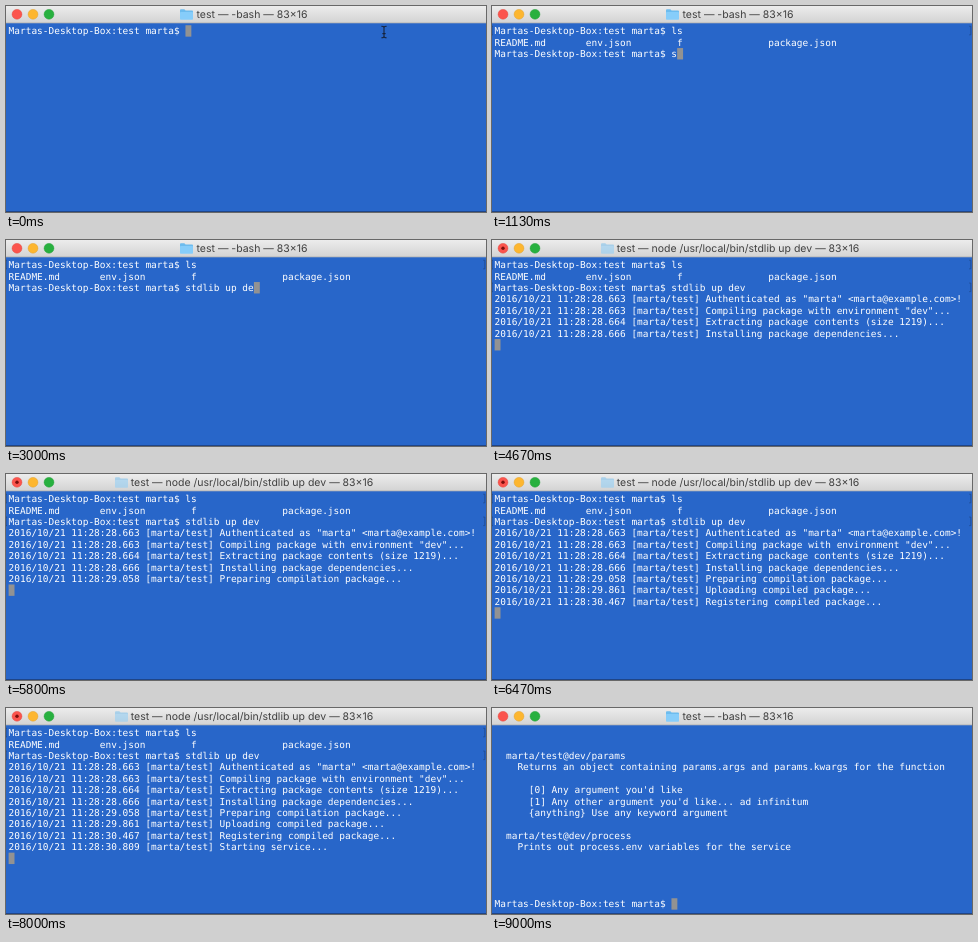
These frames come from a looping animation (480 px wide and 206 px high, 9070 ms). An HTML page:

```html
<!DOCTYPE html>
<html lang="en">
<head>
<meta charset="utf-8">
<title>Terminal</title>
<style>
  html, body { margin: 0; width: 100%; height: 100%; overflow: hidden; background: #2866c9; }
  svg { display: block; width: 100vw; height: 100vh; }
  text { white-space: pre; text-rendering: geometricPrecision; }
  #screen text { font: 9.476px "DejaVu Sans Mono", monospace; fill: #fff; }
  #title { font: 10.5px Inter, Roboto, sans-serif; fill: #404040; text-anchor: middle; }
  #marks path { fill: none; stroke: #1d4687; stroke-opacity: .7; }
</style>
</head>
<body>
<svg viewBox="0 0 480 206">
  <defs>
    <linearGradient id="chrome" x2="0" y2="1">
      <stop stop-color="#ececec"/>
      <stop offset="1" stop-color="#d3d3d3"/>
    </linearGradient>
  </defs>
  <rect width="480" height="206" fill="#2866c9"/>
  <rect y="205" width="480" height="1" fill="#1f4588"/>
  <rect width="480" height="17" fill="url(#chrome)"/>
  <rect y="16.5" width="480" height=".8" fill="#b4b4b4"/>
  <g stroke-width=".5">
    <circle cx="11" cy="8.3" r="4.9" fill="#fb544d" stroke="#e2483f"/>
    <circle cx="27" cy="8.3" r="4.9" fill="#fdb62f" stroke="#e0a02f"/>
    <circle cx="43" cy="8.3" r="4.9" fill="#28b03f" stroke="#23a038"/>
  </g>
  <circle id="dot" cx="11" cy="8.3" r="1.7" fill="#7a0f0c"/>
  <g id="folder">
    <path d="M0 1.2Q0 .3 .9 .3H4.3L5.6 1.6H12Q13 1.6 13 2.5V10H0Z" fill="#6dbcee"/>
    <rect y="3" width="13" height="7.8" rx=".8" fill="#86cdfa"/>
  </g>
  <text id="title" x="246" y="12.2"></text>
  <g id="marks"></g>
  <rect id="cursor" width="5.9" height="11.4" fill="#929292"/>
  <g id="screen"></g>
  <path id="beam" d="M375.8 20.2Q378 20.2 378 21.8V30.2Q378 31.8 375.8 31.8M380.2 20.2Q378 20.2 378 21.8M378 30.2Q378 31.8 380.2 31.8M376.8 27.6H379.2" fill="none" stroke="#16233c" stroke-width="1.1" stroke-linecap="round"/>
</svg>
<script>
const LOOP = 9070, LEFT = 2.6, TOP = 19.25, COL = 5.705, ROW = 11.4;
const PROMPT = 'Martas-Desktop-Box:test marta$ ';
const LIST_RUN = 530, UP_RUN = 3530, NODE_TITLE = 3670, HELP = 8070, SHELL_TITLE = 8130;

const listKeys = [200, 330];
const upKeys = [1130, 1400, 1600, 1730, 1930, 2070, 2200, 2330, 2530, 2670, 2800, 3000, 3330];

const log = [
  [4670, '28.663', 'Authenticated as "marta" <marta@example.com>!'],
  [4670, '28.663', 'Compiling package with environment "dev"...'],
  [4670, '28.664', 'Extracting package contents (size 1219)...'],
  [4670, '28.666', 'Installing package dependencies...'],
  [5070, '29.058', 'Preparing compilation package...'],
  [5870, '29.861', 'Uploading compiled package...'],
  [6470, '30.467', 'Registering compiled package...'],
  [6800, '30.809', 'Starting service...']
];

const help = [
  '', '',
  '  marta/test@dev/params',
  '    Returns an object containing params.args and params.kwargs for the function',
  '',
  "      [0] Any argument you'd like",
  "      [1] Any other argument you'd like... ad infinitum",
  '      {anything} Use any keyword argument',
  '',
  '  marta/test@dev/process',
  '    Prints out process.env variables for the service',
  '', '', '', '',
  PROMPT
];

const listing = ['README.md', 'env.json', 'f', 'package.json'].map(name => name.padEnd(16)).join('').trimEnd();
const byId = id => document.getElementById(id);
const show = (id, on) => byId(id).setAttribute('visibility', on ? 'visible' : 'hidden');
const typed = (text, keys, t) => text.slice(0, keys.filter(key => t >= key).length);

// The last line always holds the cursor.
function linesAt(t) {
  if (t >= HELP) return help;
  const lines = [PROMPT + typed('ls', listKeys, t)];
  if (t < 470) return lines;
  if (t < LIST_RUN) return [...lines, ''];
  lines.push(listing, PROMPT + typed('stdlib up dev', upKeys, t));
  if (t < UP_RUN) return lines;
  for (const [at, seconds, message] of log) {
    if (t >= at) lines.push(`2016/10/21 11:28:${seconds} [marta/test] ${message}`);
  }
  return [...lines, ''];
}

function marksAt(t) {
  if (t < LIST_RUN || t >= HELP) return [];
  return t < UP_RUN ? [0] : [0, 2];
}

function markPath(row) {
  const y = TOP + row * ROW + 1;
  return `M1 ${y}H0v8.6H1M477.2 ${y}h1.6v8.6h-1.6`;
}

function addNode(parent, tag, attributes, text = '') {
  const node = document.createElementNS('http://www.w3.org/2000/svg', tag);
  for (const name in attributes) node.setAttribute(name, attributes[name]);
  node.textContent = text;
  parent.append(node);
}

let shown = '';

function draw() {
  const t = performance.now() % LOOP;
  const lines = linesAt(t), marks = marksAt(t);
  const busy = t >= NODE_TITLE && t < SHELL_TITLE;
  const beam = t < 270;
  const state = JSON.stringify([lines, marks, busy, beam]);

  if (state !== shown) {
    shown = state;
    byId('screen').replaceChildren();
    lines.forEach((line, row) =>
      addNode(byId('screen'), 'text', { x: LEFT, y: TOP + row * ROW + 9 }, line));

    byId('marks').replaceChildren();
    marks.forEach(row => addNode(byId('marks'), 'path', { d: markPath(row) }));

    const row = lines.length - 1;
    byId('cursor').setAttribute('x', LEFT + lines[row].length * COL);
    byId('cursor').setAttribute('y', TOP + row * ROW);

    const command = busy ? 'node /usr/local/bin/stdlib up dev' : '-bash';
    byId('title').textContent = `test — ${command} — 83×16`;
    byId('folder').setAttribute('transform', `translate(${busy ? 109 : 174} 3)`);
    byId('folder').setAttribute('opacity', busy ? .5 : 1);
    show('dot', busy);
    show('beam', beam);
  }
  requestAnimationFrame(draw);
}

draw();
</script>
</body>
</html>
```
